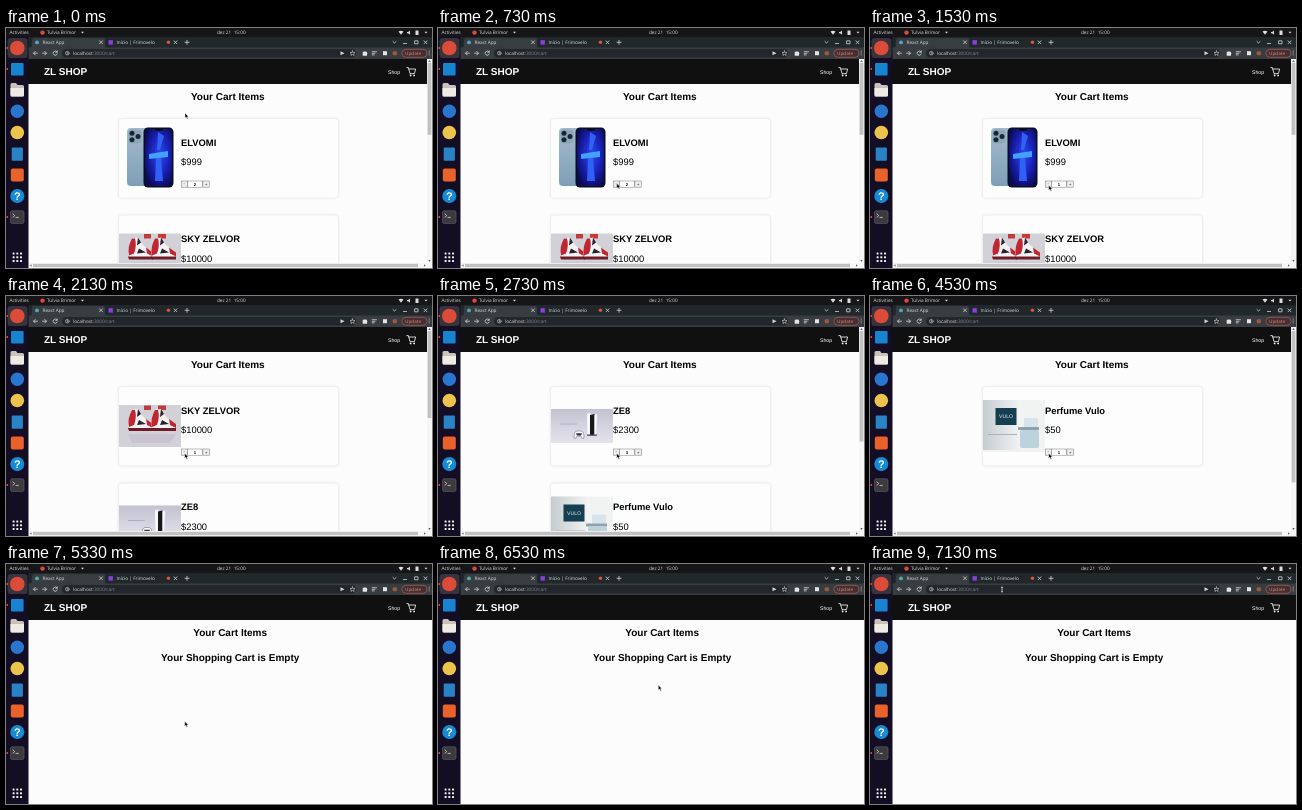
Recreate the animation shown at these times as an HTML page. Size 426 by 240 pixels, loop 7190 ms.

```html
<!DOCTYPE html>
<html lang="en">
<head>
<meta charset="utf-8">
<title>Shopping cart</title>
<style>
  html, body { margin: 0; width: 100%; height: 100%; overflow: hidden; background: #fcfcfc; }
  svg { display: block; width: 100%; height: 100%; }
  text { font-family: "Liberation Sans", Arial, sans-serif; text-rendering: geometricPrecision; }
  .ui { font-family: "Open Sans", "Noto Sans", sans-serif; font-size: 4.7px; fill: #dcdcdc; }
  .head { font-size: 10px; font-weight: bold; text-anchor: middle; }
  .name { font-size: 9.4px; font-weight: bold; }
  .price { font-size: 9.4px; }
  .tiny { font-size: 4.2px; text-anchor: middle; }
  .line { fill: none; stroke: #d4d4d4; stroke-width: .8; stroke-linecap: round; stroke-linejoin: round; }
  .card { fill: #fdfdfd; filter: drop-shadow(0 .7px 1.6px rgba(0, 0, 0, .15)); }
  .box { fill: #efefef; stroke: #777; stroke-width: .5; }
</style>
</head>
<body>
<svg viewBox="0 0 426 240" preserveAspectRatio="none">
  <defs>
    <radialGradient id="screen" cx=".55" cy=".45" r=".65">
      <stop offset="0" stop-color="#2a4cf0"/><stop offset=".55" stop-color="#1a1fb4"/><stop offset="1" stop-color="#0a0a4c"/>
    </radialGradient>
    <linearGradient id="back" x1="0" y1="0" x2="0" y2="1">
      <stop offset="0" stop-color="#a3bccb"/><stop offset="1" stop-color="#7f9fb8"/>
    </linearGradient>
    <linearGradient id="mist" x1="0" y1="0" x2="0" y2="1">
      <stop offset="0" stop-color="#c3c2d2"/><stop offset="1" stop-color="#e4e3ec"/>
    </linearGradient>
    <linearGradient id="silver" x1="0" y1="0" x2="1" y2="0">
      <stop offset="0" stop-color="#c5ccd0"/><stop offset="1" stop-color="#f3f4f4"/>
    </linearGradient>
    <clipPath id="view"><rect id="viewBox" x="22" y="56" width="399" height="179"/></clipPath>

    <g id="phone">
      <rect x="121" y="100" width="25" height="58" rx="4" fill="url(#back)"/>
      <rect x="122.5" y="101.5" width="13" height="14" rx="3.5" fill="#8ba6ba"/>
      <g fill="#1b2634">
        <circle cx="126" cy="105.3" r="2.5"/><circle cx="126" cy="111.8" r="2.5"/><circle cx="132" cy="108.5" r="2.5"/>
      </g>
      <rect x="137.5" y="99.5" width="30" height="60" rx="4.5" fill="#0b0e20"/>
      <rect x="139" y="101" width="27" height="57" rx="3.3" fill="url(#screen)"/>
      <path d="M152 104L158 108L154 122H151ZM150 130H155L157 153H149Z" fill="#2f62f4"/>
      <path d="M143 126L162 123V129L143 131Z" fill="#46a0ff"/>
      <rect x="149" y="100.5" width="8" height="2.5" rx="1.2" fill="#0b0e20"/>
    </g>

    <g id="shoes">
      <rect x="113" y="109" width="62" height="42" fill="#d3d1d8"/>
      <rect x="138" y="109.5" width="7" height="4.5" fill="#c23a3a"/><rect x="152" y="109.5" width="8" height="4.5" fill="#c23a3a"/>
      <g id="shoe">
        <path d="M123 133Q121 124 126 114L132 113Q135 121 146 127L147 134Z" fill="#f5f2f3"/>
        <path d="M123 131Q121 123 126 114L129 114Q131 121 128 129Z" fill="#c02632"/>
        <path d="M132 113L135 118L131 121ZM133 124L140 128L131 129Z" fill="#25232c"/>
        <path d="M140 123L147 128V132L141 129Z" fill="#c02632"/>
        <path d="M122 132H147V135H123Z" fill="#6f1b28"/>
      </g>
      <use href="#shoe" x="23"/>
      <path d="M122 138H170L164 147H126Z" fill="#c9c4d0"/>
    </g>

    <g id="console">
      <rect x="113" y="113" width="62" height="34" fill="url(#mist)"/>
      <path d="M122 128H139" stroke="#a6a6b6" stroke-width=".8"/>
      <path d="M149 118Q153 115 153 120V139H149.5Z" fill="#f8f8fc"/>
      <path d="M152 119L156.5 118V139H152Z" fill="#17171e"/>
      <path d="M156.5 119Q160 116 159 123L158 139H156.5Z" fill="#f8f8fc"/>
      <rect x="149" y="138.5" width="10" height="1.3" fill="#4b4b58"/>
      <path d="M136 142Q136 135 139 135H143Q146 135 146 142Q144 144 143 140H139Q138 144 136 142Z" fill="#fafafd" stroke="#5b5b68" stroke-width=".5"/>
      <path d="M138 137.2H144L143 139.6H139Z" fill="#33333d"/>
    </g>

    <g id="perfume">
      <rect x="113" y="104" width="62" height="52" fill="#f1f3f3"/>
      <rect x="113" y="104" width="38" height="50" fill="url(#silver)"/>
      <rect x="125.5" y="112" width="21" height="17" fill="#153f50"/>
      <text x="136" y="122.3" class="tiny" style="font-size:5.2px" fill="#e5eeee">VULO</text>
      <rect x="118" y="138" width="29" height="1" fill="#aab4b8"/>
      <rect x="154" y="122" width="14" height="9" rx="1" fill="#d9e4ea"/>
      <rect x="148" y="131" width="21" height="3" fill="#8fa3ae"/>
      <rect x="150" y="134" width="19" height="18" rx="2" fill="#bcd2dc"/>
    </g>
  </defs>

  <rect width="426" height="240" fill="#fcfcfc"/>

  <!-- page -->
  <g clip-path="url(#view)">
    <g id="page">
      <text class="head" x="221.8" y="72">Your Cart Items</text>
      <text class="head" id="empty" x="221.8" y="97">Your Shopping Cart is Empty</text>
      <g id="cards"></g>
    </g>
  </g>
  <path d="M22 31H426V56H22Z" fill="#101010"/>
  <text x="38" y="47.4" font-size="10" font-weight="bold" fill="#fff">ZL SHOP</text>
  <text x="382" y="45.8" font-size="5.2" fill="#fff">Shop</text>
  <path class="line" style="stroke:#fff" d="M400.8 39.6H402.4L404 45.6H408.4L409.6 41H402.9"/>
  <g fill="#fff"><circle cx="404.6" cy="47.4" r=".9"/><circle cx="408.1" cy="47.4" r=".9"/></g>
  <g id="bars">
    <rect x="421" y="31" width="5" height="204" fill="#f6f6f6"/>
    <rect x="22" y="235" width="404" height="5" fill="#f6f6f6"/>
    <rect id="thumb" x="421.6" y="35" width="3.8" fill="#c1c1c1"/>
    <rect x="27" y="235.8" width="385" height="3.4" fill="#c1c1c1"/>
    <path d="M422.2 34L423.5 32L424.8 34ZM422.2 232L423.5 234L424.8 232ZM25.5 236.2L23.8 237.5L25.5 238.8ZM418 236.2L419.7 237.5L418 238.8Z" fill="#666"/>
  </g>

  <!-- browser -->
  <path d="M22 9H426V20H22Z" fill="#21282b"/>
  <path d="M24 20Q26 20 26 17V12Q26 10 28 10H97Q99 10 99 12V17Q99 20 101 20Z" fill="#383d41"/>
  <path d="M22 19.5H426V31H22Z" fill="#383d41"/>
  <circle cx="31" cy="14.4" r="1.9" fill="#4fa9bd"/>
  <text class="ui" x="36.5" y="16">React App</text>
  <rect x="102.5" y="12.2" width="4.4" height="4.4" fill="#8a3ee0"/>
  <text class="ui" x="110.5" y="16">Início | Frimovelo</text>
  <circle cx="162.5" cy="14.3" r="1.8" fill="#d8503f"/>
  <path class="line" d="M93.5 12.8L96.5 15.8M96.5 12.8L93.5 15.8M168 12.8L171 15.8M171 12.8L168 15.8M179 14.3H183M181 12.3V16.3M387 13.6L388.5 15L390 13.6M397.5 15.5H400.5M409 12.8H412V15.8H409ZM418 12.8L421 15.8M421 12.8L418 15.8"/>
  <rect x="56" y="21" width="294" height="8.6" rx="4.3" fill="#22272b"/>
  <path class="line" d="M31.5 25.2H27.5L29.3 23.4M27.5 25.2L29.3 27M36.5 25.2H40.5L38.7 23.4M40.5 25.2L38.7 27M51 24A2.1 2.1 0 1 0 51.2 26M51.2 22.8V24.3H49.7"/>
  <circle cx="61.3" cy="25.2" r="1.8" class="line" style="stroke-width:.6"/>
  <path class="line" style="stroke-width:.6" d="M61.3 25V26.2M61.3 24.2V24.3"/>
  <text class="ui" x="67" y="27">localhost<tspan fill="#85898e">:3000/cart</tspan></text>
  <path d="M334.5 23.2L338.5 25.2L334.5 27.2Z" fill="#d4d4d4"/>
  <path class="line" style="stroke-width:.6" d="M346.5 22.8L347.2 24.5L349 24.6L347.6 25.8L348.1 27.5L346.5 26.5L344.9 27.5L345.4 25.8L344 24.6L345.8 24.5Z"/>
  <path d="M356.7 23.8H358A1 1 0 0 1 359.8 23.8H361V25A1 1 0 0 1 361 26.6V27.7H356.7Z" fill="#e4e4e4"/>
  <path class="line" d="M366.2 23.7H370.5M366.2 25.3H369M366.2 26.9H368.2"/>
  <path d="M377 23.2H381V27.2H377Z" fill="#e4e4e4"/>
  <circle cx="388.8" cy="25.2" r="2.3" fill="#a3553c"/>
  <rect x="396" y="21.3" width="25" height="8" rx="4" fill="#423032" stroke="#c7665c" stroke-width=".6"/>
  <text class="ui" x="399" y="27" style="fill:#e58579">Update</text>
  <path d="M423.2 23V27.5" class="line" stroke-dasharray=".1 1.8"/>

  <!-- desktop -->
  <rect width="426" height="9" fill="#161618"/>
  <text class="ui" x="3.5" y="6.3">Activities</text>
  <circle cx="36.5" cy="4.6" r="2.2" fill="#dc4a38"/>
  <text class="ui" x="41" y="6.3">Tulvia Brimor</text>
  <path d="M75 3.8H78L76.5 5.5Z" fill="#dcdcdc"/>
  <text class="ui" x="211" y="6.3">dez 21&#160; 15:00</text>
  <path d="M392.5 3.6Q395 1.7 397.5 3.6L395 6.7ZM401 4H402.2L404 2.5V6.8L402.2 5.3H401ZM409.5 2.6H412.5V7H409.5ZM418.5 3.8H421.5L420 5.5Z" fill="#dcdcdc"/>
  <rect y="9" width="22.5" height="231" fill="#130e24"/>
  <rect x="1.5" y="10" width="20" height="20" rx="3" fill="#37343f"/>
  <g fill="#e95420"><circle cx="1.3" cy="20" r=".9"/><circle cx="1.3" cy="41" r=".9"/><circle cx="1.3" cy="189" r=".9"/></g>
  <circle cx="11.3" cy="20" r="7.3" fill="#dc4a38"/>
  <rect x="5" y="35" width="12.6" height="12.6" rx="1" fill="#1684cf"/>
  <path d="M4.5 56.5Q4.5 55 6 55H10L11.5 57H16.5Q18 57 18 58.5V67Q18 68.5 16.5 68.5H6Q4.5 68.5 4.5 67Z" fill="#c8c2bb"/>
  <path d="M4.5 60H18V67Q18 68.5 16.5 68.5H6Q4.5 68.5 4.5 67Z" fill="#eeeae4"/>
  <circle cx="11.3" cy="83.3" r="6.7" fill="#2a76cf"/>
  <circle cx="11.3" cy="104.5" r="6.8" fill="#edc44b"/>
  <rect x="5.7" y="119.5" width="11.2" height="13.2" rx="1" fill="#2a83c4"/>
  <rect x="4.8" y="140.5" width="13" height="13" rx="2" fill="#e9622b"/>
  <circle cx="11.3" cy="168" r="7" fill="#168bd5"/>
  <text x="11.3" y="172" font-size="11" font-weight="bold" text-anchor="middle" fill="#fff">?</text>
  <rect x="4.6" y="182.8" width="13.4" height="12.6" rx="1.5" fill="#3b3a3f" stroke="#66646a" stroke-width=".6"/>
  <path class="line" d="M7 186L8.8 187.6L7 189.2M10 189.4H12.4"/>
  <g id="grid" fill="#f2f2f2"></g>

  <!-- pointer -->
  <g id="pointer">
    <path id="arrow" d="M0 0V5L1.2 4L2.1 5.9L3 5.5L2.2 3.7H3.7Z" fill="#000" stroke="#fff" stroke-width=".45"/>
    <path id="beam" d="M-1 -1.8H1M0 -1.8V2.8M-1 2.8H1" fill="none" stroke="#f2f2f2" stroke-width=".7"/>
  </g>
</svg>
<script>
  const LOOP = 7190, STEP = 1000 / 15;
  const $ = id => document.getElementById(id);
  const show = (id, on) => $(id).setAttribute("visibility", on ? "visible" : "hidden");

  const products = [
    { art: "phone", name: "ELVOMI", price: 999 },
    { art: "shoes", name: "SKY ZELVOR", price: 10000 },
    { art: "console", name: "ZE8", price: 2300 },
    { art: "perfume", name: "Perfume Vulo", price: 50 }
  ];

  // [start ms, first product left, its quantity]
  const states = [
    [0, 0, 2], [1130, 0, 1], [1730, 1, 1], [2270, 2, 3],
    [3200, 2, 2], [4070, 2, 1], [4470, 3, 1], [5000, 4, 0]
  ];

  // [ms, x, y]
  const path = [
    [0, 179, 85], [130, 179, 85], [800, 178.7, 157.3], [5530, 178.7, 157.3],
    [6130, 220.3, 121], [6530, 220.3, 121], [7000, 132, 25], [LOOP, 132, 25]
  ];

  function card(p, i, qty) {
    return `<g transform="translate(0 ${i * 96.5})">
      <rect class="card" x="113" y="91" width="219" height="78.5" rx="3"/>
      <use href="#${p.art}"/>
      <text class="name" x="175" y="117.6">${p.name}</text>
      <text class="price" x="175" y="137.4">$${p.price}</text>
      <rect class="box" x="175.3" y="153" width="6" height="6.2"/>
      <rect class="box" x="181.6" y="153" width="14.6" height="6.2" style="fill:#fff"/>
      <rect class="box" x="196.9" y="153" width="6.6" height="6.2"/>
      <text class="tiny" x="178.3" y="157.4">-</text>
      <text class="tiny" x="188.8" y="157.6" font-weight="bold">${qty}</text>
      <text class="tiny" x="200.2" y="157.6">+</text>
    </g>`;
  }

  let shown = null;
  function setState(state) {
    if (state === shown) return;
    shown = state;
    const [, first, qty] = state;
    const left = products.slice(first);
    const pageHeight = 165 + 96.5 * left.length;
    const scrolls = pageHeight > 204;
    $("cards").innerHTML = left.slice(0, 2).map((p, i) => card(p, i, i ? 1 : qty)).join("");
    $("page").setAttribute("transform", `translate(${scrolls ? 0 : 2.4} 0)`);
    $("viewBox").setAttribute("width", scrolls ? 399 : 404);
    $("viewBox").setAttribute("height", scrolls ? 179 : 184);
    $("thumb").setAttribute("height", 194 * 204 / pageHeight);
    show("bars", scrolls);
    show("empty", !left.length);
  }

  function pointerAt(t) {
    const i = path.findIndex(p => p[0] > t);
    const [t0, x0, y0] = path[i - 1], [t1, x1, y1] = path[i];
    const u = (t - t0) / (t1 - t0), k = u * u * (3 - 2 * u);
    return [x0 + (x1 - x0) * k, y0 + (y1 - y0) * k];
  }

  function draw(now) {
    const t = Math.floor((now % LOOP + 5) / STEP) * STEP;
    setState(states.filter(s => s[0] <= t + 5).pop());
    const [x, y] = pointerAt(Math.min(t, LOOP - 1));
    $("pointer").setAttribute("transform", `translate(${x} ${y})`);
    const typing = y < 30;
    show("arrow", !typing);
    show("beam", typing);
    requestAnimationFrame(draw);
  }

  $("grid").innerHTML = Array.from({ length: 9 }, (_, i) =>
    `<rect x="${6.6 + i % 3 * 3.7}" y="${224.6 + Math.floor(i / 3) * 3.7}" width="2" height="2" rx=".5"/>`).join("");
  requestAnimationFrame(draw);
</script>
</body>
</html>
```
